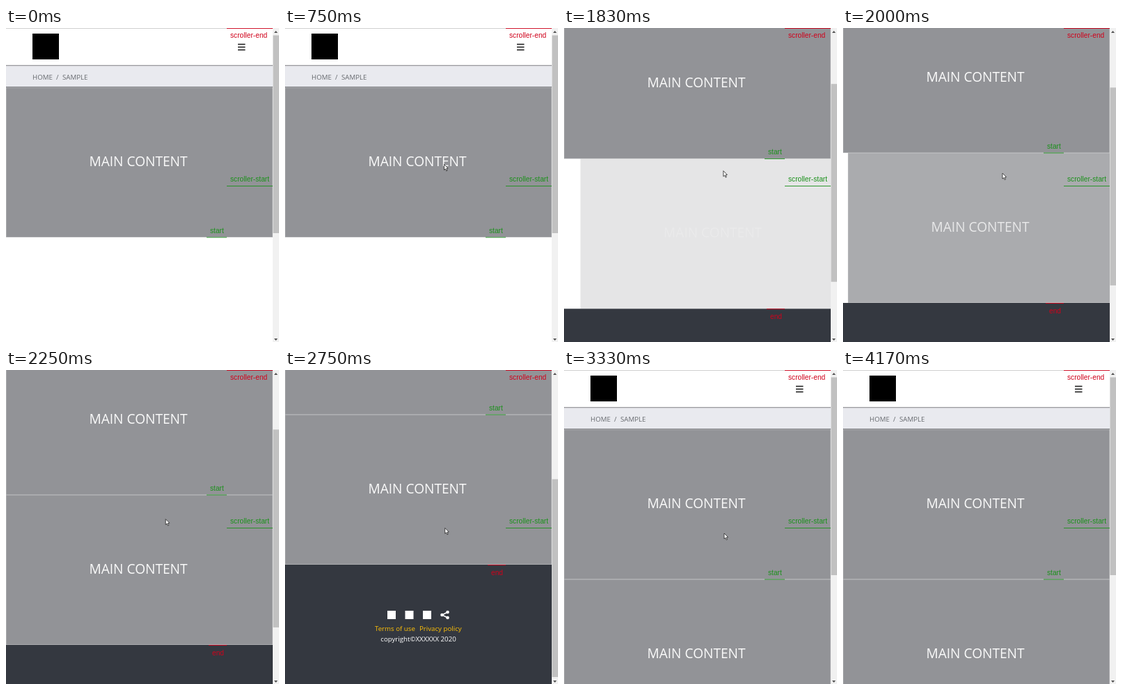
These frames come from a looping animation (392x450 px, 4410 ms). An HTML page with a canvas:

```html
<!DOCTYPE html>
<html lang="en">
<head>
<meta charset="utf-8">
<title>Scroll-triggered fade</title>
<style>
  html, body { margin: 0; width: 100%; height: 100%; overflow: hidden; background: #fff; }
  canvas { display: block; }
</style>
</head>
<body>
<canvas id="stage" width="392" height="450"></canvas>
<script>
const ctx = document.getElementById('stage').getContext('2d');
const LOOP = 4410, STEP = 1000 / 12;
const W = 392, H = 450, PAGE_W = 383, MAX_SCROLL = 236;
const NOTCH = 60.5, NOTCH_MS = 200;
const SANS = '"Open Sans", "Noto Sans", sans-serif';
const ARIAL = '"Liberation Sans", Arial, sans-serif';
const GREEN = '#1c911c', RED = '#d0021b', INK = '#66696e', WHITE = '#fff';

const progress = (t, start, duration) => Math.min(1, Math.max(0, (t - start) / duration));
const smooth = p => p * p * (3 - 2 * p);
const easeOut = p => 1 - (1 - p) ** 2;

// Distance covered by wheel notches that begin at the given times.
function wheel(t, starts) {
  return starts.reduce((sum, s) => sum + NOTCH * smooth(progress(t, s, NOTCH_MS)), 0);
}

function scrollAt(t) {
  const down = Math.min(MAX_SCROLL, wheel(t, [1371, 1680, 2300, 2500]));
  return Math.max(0, down - wheel(t, [2760, 2840, 2920, 3000]));
}

function curve(from, control, to, u) {
  return from.map((a, i) => a * (1 - u) ** 2 + 2 * control[i] * u * (1 - u) + to[i] * u * u);
}

// Enters from the top, drifts down while scrolling, leaves at the top.
function cursorAt(t) {
  if (t < 1167) return curve([330, -12], [130, 150], [228, 195], easeOut(progress(t, 120, 630)));
  const drift = progress(t, 1167, 1850) ** 1.4;
  const rest = [228 + 1.5 * drift, 195 + 38.5 * drift];
  return curve(rest, [230, 120], [300, -14], smooth(progress(t, 3417, 580)));
}

function rect(x, y, w, h, color) {
  ctx.fillStyle = color;
  ctx.fillRect(x, y, w, h);
}

function text(str, x, y, size, color, font = SANS, align = 'left') {
  ctx.font = `${size}px ${font}`;
  ctx.fillStyle = color;
  ctx.textAlign = align;
  ctx.fillText(str, x, y);
}

function polygon(points, color) {
  ctx.beginPath();
  points.forEach(p => ctx.lineTo(...p));
  ctx.closePath();
  ctx.fillStyle = color;
  ctx.fill();
}

function header() {
  rect(0, 0, PAGE_W, 1, '#d0d0d0');
  rect(38, 8, 38, 37, '#000');
  for (let i = 0; i < 3; i++) rect(333, 22.6 + 4 * i, 10.5, 1.6, '#222');
  rect(0, 53.5, PAGE_W, 31.5, '#e9eaef');
  for (const y of [53.4, 84]) rect(0, y, PAGE_W, 0.8, '#66676b');
  text('HOME', 38, 73.5, 9.7, INK);
  text('/', 72, 73.5, 9.7, INK);
  text('SAMPLE', 81, 73.5, 9.7, INK);
}

function section(x, y) {
  rect(x, y, PAGE_W, 215, '#929397');
  ctx.strokeStyle = 'rgba(255,255,255,.45)';
  ctx.lineWidth = 0.5;
  ctx.strokeRect(x + 0.25, y + 0.25, PAGE_W - 0.5, 214.5);
  text('MAIN CONTENT', x + 190, y + 112.5, 19.1, '#fafafa', `500 ${SANS}`.slice(4), 'center');
}

function shareIcon(x, y) {
  const dots = [[x + 4, y - 4], [x - 4, y], [x + 4, y + 4]];
  ctx.strokeStyle = ctx.fillStyle = WHITE;
  ctx.lineWidth = 1.6;
  ctx.beginPath();
  dots.forEach(p => ctx.lineTo(...p));
  ctx.stroke();
  for (const [cx, cy] of dots) {
    ctx.beginPath();
    ctx.arc(cx, cy, 2.3, 0, 7);
    ctx.fill();
  }
}

function footer() {
  rect(0, 515, PAGE_W, 172, '#343840');
  for (let i = 0; i < 3; i++) rect(147 + 25.5 * i, 581, 12, 12, WHITE);
  shareIcon(229.5, 587);
  text('Terms of use', 129, 610, 9.7, '#ffc107');
  text('Privacy policy', 193, 610, 9.7, '#ffc107');
  text('copyright©XXXXXX 2020', 191.5, 625, 9.7, WHITE, SANS, 'center');
}

function marker(label, x, right, lineY, textY, color) {
  rect(x, lineY, right - x, 0.9, color);
  text(label, x + 5, textY, 10.2, color, ARIAL);
}

function scrollbar(scroll) {
  rect(PAGE_W, 0, W - PAGE_W, H, '#f1f1f1');
  rect(383.5, 10.5 + scroll * 146 / MAX_SCROLL, 8.5, 283.5, '#c1c1c1');
  polygon([[385, 7], [387.5, 4], [390, 7]], '#505050');
  polygon([[385, 445], [387.5, 448], [390, 445]], '#505050');
}

function cursor([x, y]) {
  ctx.save();
  ctx.translate(x + 0.5, y + 0.5);
  polygon([[0, 0], [0, 8], [1.8, 6.4], [3.2, 9.4], [4.5, 8.8], [3.2, 5.9], [5.6, 5.6]], WHITE);
  ctx.strokeStyle = '#222';
  ctx.lineWidth = 0.8;
  ctx.stroke();
  ctx.restore();
}

function draw(t) {
  const scroll = scrollAt(t);
  const shown = easeOut(progress(t, 1780, 420));

  rect(0, 0, W, H, WHITE);
  ctx.save();
  ctx.translate(0, -scroll);
  header();
  section(0, 85);
  ctx.globalAlpha = shown;
  section(31 * (1 - shown), 300);
  ctx.globalAlpha = 1;
  footer();
  marker('start', 288, 317, 299.6, 293.5, GREEN);
  marker('end', 291, 317, 515, 529.5, RED);
  ctx.restore();

  marker('scroller-end', 317, PAGE_W, 0, 14.2, RED);
  marker('scroller-start', 317, PAGE_W, 226, 219.5, GREEN);
  scrollbar(scroll);
  cursor(cursorAt(t));
}

// The picture advances twelve times a second; the offset absorbs clock rounding.
const start = performance.now();
function tick() {
  const t = (performance.now() - start) % LOOP;
  draw(Math.floor((t + 5) / STEP) * STEP);
  requestAnimationFrame(tick);
}
tick();
</script>
</body>
</html>
```
